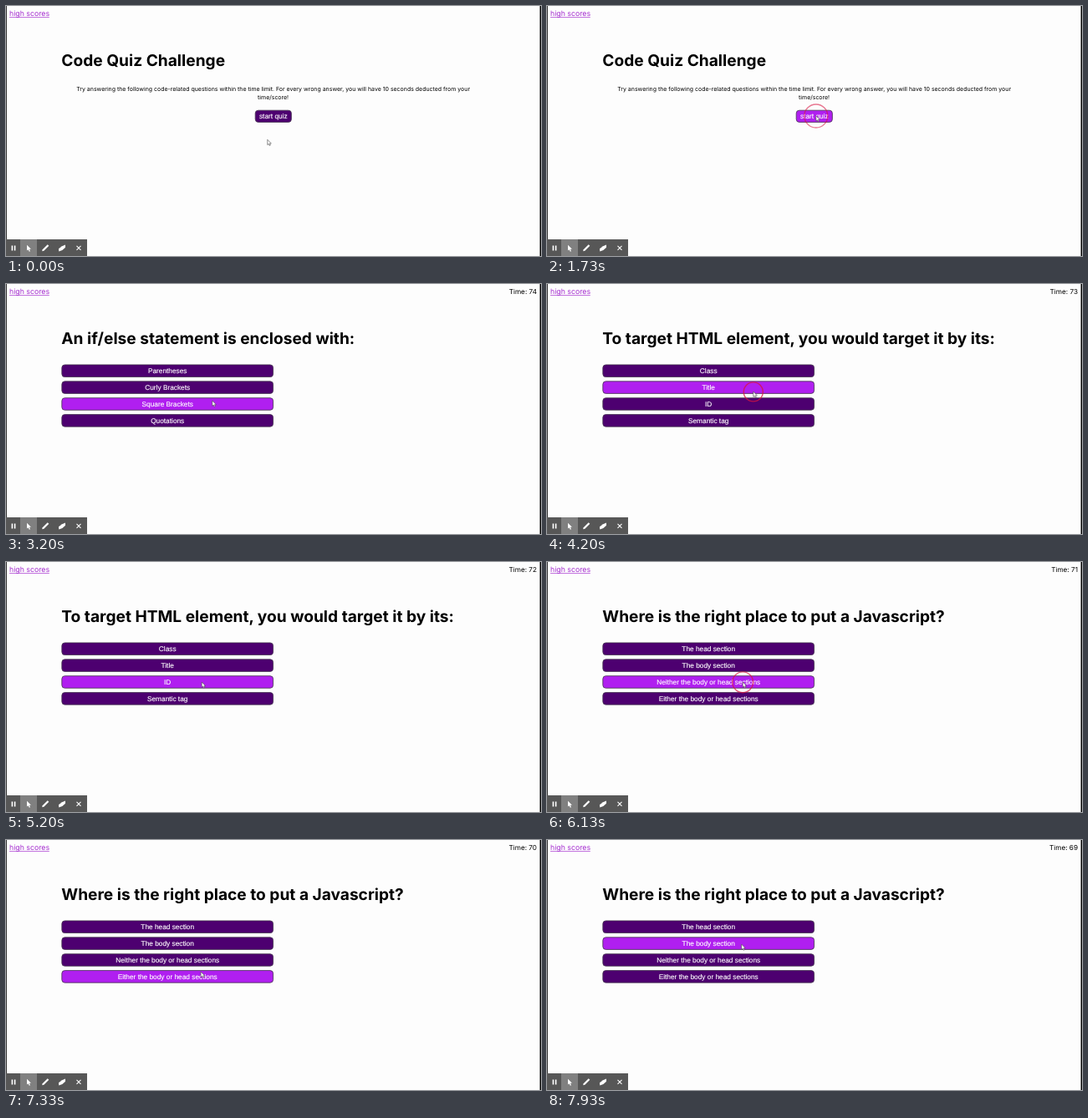
These frames come from a looping animation (640 px wide and 300 px high, 8000 ms). An HTML page:

```html
<!DOCTYPE html>
<html lang="en">
<head>
<meta charset="utf-8">
<title>Code quiz</title>
<style>
  html, body { margin: 0; width: 100%; height: 100%; overflow: hidden; background: #fdfdfd; }
  svg { display: block; width: 640px; height: 300px; }
  text { font-family: Inter, "Open Sans", sans-serif; text-rendering: geometricPrecision; }
  .title { font-size: 19.15px; font-weight: 700; }
  .nav { font-size: 8.75px; }
  .link { fill: #a42bcf; }
  .time { font-size: 8.2px; text-anchor: end; }
  .intro { font-size: 6.97px; text-anchor: middle; }
  .button rect { fill: #4d0070; stroke: #45354f; stroke-width: .8; }
  .button.hover rect { fill: #b01ff0; }
  .button text {
    font: 8.3px "Liberation Sans", Arial, sans-serif;
    fill: #fff; stroke: #fff; stroke-width: .15; text-anchor: middle;
  }
</style>
</head>
<body>
<svg viewBox="0 0 640 300">
  <rect width="640" height="300" fill="#fdfdfd"/>
  <rect width=".9" height="300" fill="#222"/>
  <rect x="638.6" width="1.4" height="300"/>

  <text class="nav link" x="4" y="12.3">high scores</text>
  <path d="M4 13.6H51.8" stroke="#a42bcf" stroke-width=".7"/>
  <text id="time" class="time" x="635" y="12.3"></text>
  <text id="title" class="title" x="66.3" y="72.3"></text>

  <g id="intro">
    <text class="intro" x="319.6" y="102.2">Try answering the following code-related questions within the time limit. For every wrong answer, you will have 10 seconds deducted from your</text>
    <text class="intro" x="319.6" y="112.2">time/score!</text>
  </g>
  <g id="buttons"></g>

  <g fill="#fff">
    <rect y="280" width="97" height="20" fill="#575757"/>
    <rect x="17" y="280" width="20" height="20" fill="#808080"/>
    <path d="M6.6 287.5h1.6v6H6.6zM9.8 287.5h1.6v6H9.8z"/>
    <path d="M25 286.8V293.6L26.6 292.2L27.8 294.8L29 294.2L27.8 291.8H30Z"/>
    <path d="M43.2 294.3L43.7 292.2L49.7 286.2L51.3 287.8L45.3 293.8Z"/>
    <path d="M63 291.2L67 288.2L71 286.6V289.8L67.4 293L63.2 294.4Z"/>
    <path d="M84.5 287.8l5 5m0-5l-5 5" stroke="#fff" stroke-width="1.1"/>
  </g>

  <circle id="ring" fill="none" stroke="#d81440" stroke-width="1.4"/>
  <path id="cursor" d="M0 0V6.3L1.4 5.1L2.4 7.2L3.5 6.7L2.6 4.7H4.5Z" fill="#fff" stroke="#444" stroke-width=".6" stroke-linejoin="round"/>
</svg>

<script>
const LOOP = 8000;
const ROW = 19.9;
const CLICK_LEAD = 200;
const RING_LIFE = 340;
const SVG_NS = "http://www.w3.org/2000/svg";

const screens = [
  { from: 0, title: "Code Quiz Challenge" },
  { from: 1860, title: "An if/else statement is enclosed with:",
    options: ["Parentheses", "Curly Brackets", "Square Brackets", "Quotations"] },
  { from: 4130, title: "To target HTML element, you would target it by its:",
    options: ["Class", "Title", "ID", "Semantic tag"] },
  { from: 6130, title: "Where is the right place to put a Javascript?",
    options: ["The head section", "The body section",
              "Neither the body or head sections", "Either the body or head sections"] }
];

const ui = Object.fromEntries(["time", "title", "intro", "buttons", "ring", "cursor"]
  .map(id => [id, document.getElementById(id)]));

function make(tag, parent, attrs) {
  const node = document.createElementNS(SVG_NS, tag);
  for (const key in attrs) node.setAttribute(key, attrs[key]);
  return parent.appendChild(node);
}

function addButton(x, y, w, h) {
  const g = make("g", ui.buttons, { class: "button" });
  make("rect", g, { x, y, width: w, height: h, rx: 3.6 });
  const label = make("text", g, { x: x + w / 2, y: y + h / 2 + 2.9 });
  return { g, label, x, y, w, h };
}

const start = addButton(298.2, 125.2, 43.2, 14.2);
start.label.textContent = "start quiz";
const options = [0, 1, 2, 3].map(i => addButton(66.8, 96.9 + i * ROW, 252.8, 14.6));

// Eased 0 to 1 between two times
function ramp(t, from, to) {
  const p = Math.min(1, Math.max(0, (t - from) / (to - from)));
  return p * p * (3 - 2 * p);
}

// Down to the last row and back up again
const dip = (t, mid, half) => ramp(t, mid - half, mid) - ramp(t, mid, mid + half);

// The pointer drifts left in three moves; its height is counted in rows.
function pointerAt(t) {
  const x = 312.8 + 9 * ramp(t, 400, 1130) - 75 * ramp(t, 1930, 3000)
    - 12.6 * ramp(t, 4500, 5200) - 1.5 * ramp(t, 6200, 7900);
  const row = 2.82 - 1.44 * ramp(t, 400, 1130)
    + .42 * ramp(t, 2700, 3200) - .55 * ramp(t, 3550, 3860)
    + .75 * ramp(t, 4700, 5100) - .95 * ramp(t, 6250, 6600)
    + dip(t, 3450, 250) + .8 * dip(t, 5450, 250) + 1.75 * dip(t, 7400, 500);
  return [x, 104.2 + ROW * row];
}

function setButton(b, visible, [px, py]) {
  const inside = px >= b.x && px <= b.x + b.w && py >= b.y && py <= b.y + b.h;
  b.g.style.display = visible ? "" : "none";
  b.g.classList.toggle("hover", inside);
}

// Each click ring tightens and darkens around a change of screen.
function drawRing(t, [x, y]) {
  const age = screens.slice(1).map(s => t - s.from + CLICK_LEAD)
    .find(a => a >= 0 && a < RING_LIFE);
  ui.ring.style.display = age === undefined ? "none" : "";
  if (age === undefined) return;
  ui.ring.setAttribute("cx", x);
  ui.ring.setAttribute("cy", y + .3);
  ui.ring.setAttribute("r", 14.9 - age / 80);
  ui.ring.setAttribute("opacity", .5 + age / 1000);
}

function render(t) {
  const screen = screens.findLast(s => s.from <= t);
  const quiz = Boolean(screen.options);
  const pos = pointerAt(t);

  ui.title.textContent = screen.title;
  ui.intro.style.display = quiz ? "none" : "";
  ui.time.textContent = quiz ? "Time: " + (75 - Math.floor((t - 1800) / 1000)) : "";

  setButton(start, !quiz, pos);
  options.forEach((b, i) => {
    if (quiz) b.label.textContent = screen.options[i];
    setButton(b, quiz, pos);
  });

  ui.cursor.setAttribute("transform", `translate(${pos})`);
  drawRing(t, pos);
}

const origin = performance.now();
function tick() {
  render((performance.now() - origin) % LOOP);
  requestAnimationFrame(tick);
}
tick();
</script>
</body>
</html>
```
